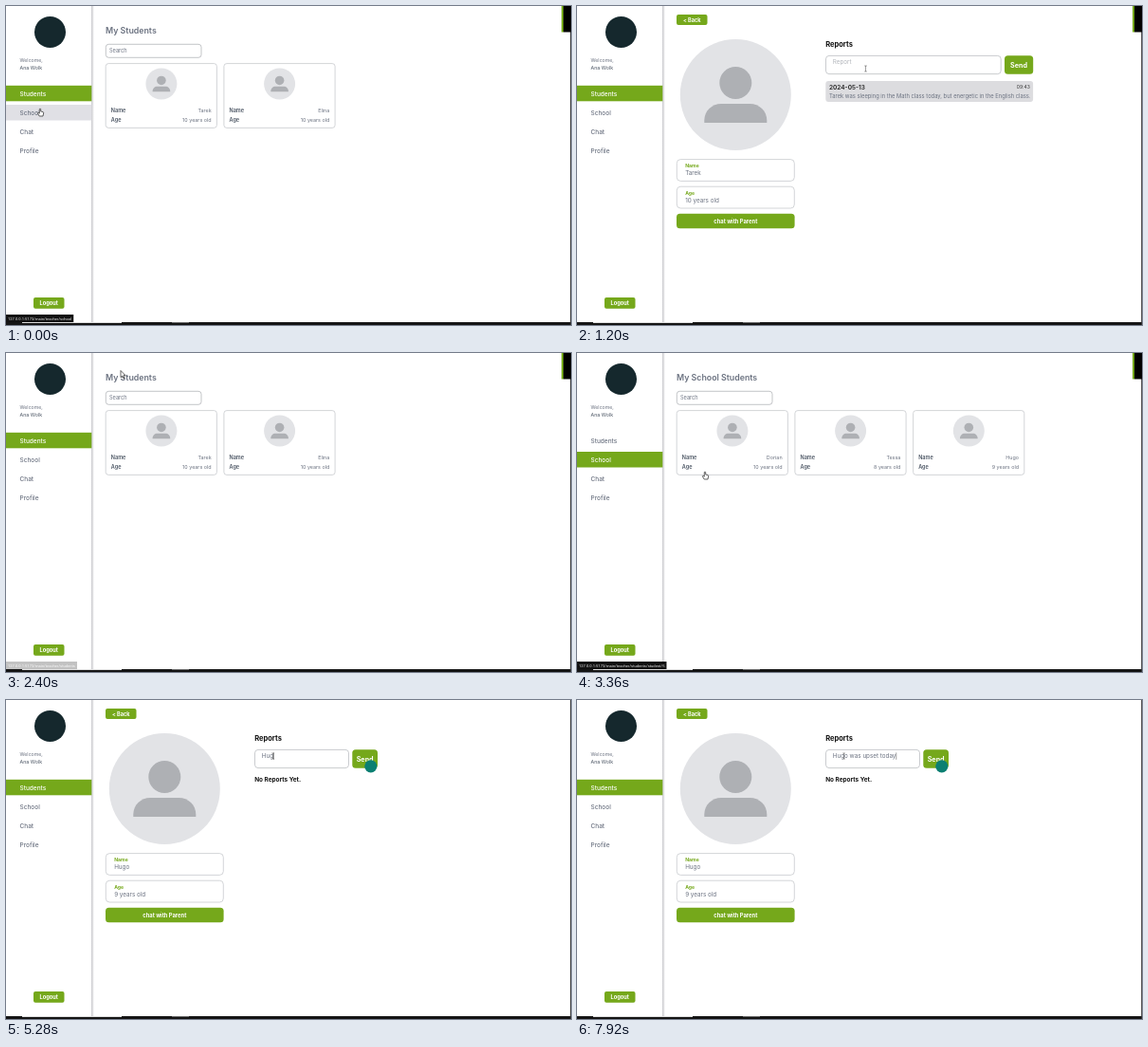
An HTML page for the animation above (8 s loop, 596 by 336 pixels).

```html
<!DOCTYPE html>
<html lang="en">
<head>
<meta charset="utf-8">
<title>School portal</title>
<style>
html, body { margin: 0; width: 100%; height: 100%; overflow: hidden; background: #fff; }
svg { display: block; width: 100vw; height: 100vh; }
text { font-family: Inter, Roboto, sans-serif; white-space: pre; }
.status text { font-family: Roboto, "Open Sans", sans-serif; }
</style>
</head>
<body>
<svg id="stage" viewBox="0 0 596 336">
  <defs>
    <linearGradient id="edge">
      <stop offset="0" stop-color="#c6c6ca"/>
      <stop offset="1" stop-color="#fff"/>
    </linearGradient>
    <g id="avatar">
      <circle r="58.5" fill="#e2e3e6"/>
      <circle cy="-12.5" r="17" fill="#aeb0b4"/>
      <path d="M-33 29.500V27C-33 17-25 9.500-15 9.500H15C25 9.500 33 17 33 27V29.500z" fill="#aeb0b4"/>
    </g>
  </defs>
</svg>
<script>
const LOOP = 8000;
const GREEN = '#75a81b', GRAY = '#6b7280', DARK = '#4b5563', LINE = '#c0c3c7';
const stage = document.getElementById('stage');

function add(parent, tag, attrs = {}, content) {
  const node = document.createElementNS('http://www.w3.org/2000/svg', tag);
  for (const key in attrs) node.setAttribute(key, attrs[key]);
  if (content !== undefined) node.textContent = content;
  return parent.appendChild(node);
}
const group = (parent, cls = '') => add(parent, 'g', { class: cls });
const box = (parent, x, y, width, height, fill, rx = 0, stroke = 'none') =>
  add(parent, 'rect', { x, y, width, height, fill, rx, stroke, 'stroke-width': 0.7 });
const label = (parent, x, y, str, size, fill = GRAY, weight = 400, anchor = 'start') =>
  add(parent, 'text', { x, y, 'font-size': size, fill, 'font-weight': weight, 'text-anchor': anchor }, str);
const show = (node, on) => node.setAttribute('display', on ? 'inline' : 'none');

function button(parent, x, y, w, h, str, size, rx = 2) {
  box(parent, x, y, w, h, GREEN, rx);
  label(parent, x + w / 2, y + h / 2 + size * 0.36, str, size, '#fff', 700, 'middle');
}

function listPage(title, students) {
  const page = group(stage);
  label(page, 105, 29.2, title, 8.8, GRAY, 600);
  box(page, 105.3, 40.3, 100.7, 14, '#fff', 3, '#a9acb1');
  label(page, 109, 49.3, 'Search', 5.6);
  students.forEach(([name, age], i) => {
    const x = 105.2 + i * 124.7;
    box(page, x, 60.6, 117.2, 67.8, '#fff', 3, LINE);
    add(page, 'use', { href: '#avatar', transform: `translate(${x + 58.7} 82) scale(.282)` });
    [['Name', name], ['Age', age + ' years old']].forEach(([key, value], row) => {
      const y = 112.2 + row * 9.5;
      label(page, x + 5.6, y, key, 5.5, DARK, 600);
      label(page, x + 111.4, y, value, 5.4, GRAY, 400, 'end');
    });
  });
  return page;
}

function studentPage(name, age, fieldWidth, sendWidth) {
  const page = group(stage);
  button(page, 105, 9, 32.5, 11, '< Back', 5.6);
  add(page, 'use', { href: '#avatar', transform: 'translate(167.3 93.5)' });
  [['Name', name], ['Age', age + ' years old']].forEach(([key, value], row) => {
    const y = 161.6 + row * 28.6;
    box(page, 105.3, y, 124, 22.8, '#fff', 4, LINE);
    label(page, 114.2, y + 8.3, key, 5.1, GREEN, 700);
    label(page, 114.2, y + 16.5, value, 6.3);
  });
  button(page, 105, 218.8, 124.6, 15.4, 'chat with Parent', 5.8, 3.5);
  label(page, 262.2, 42.6, 'Reports', 7.5, '#111', 700);
  box(page, 262.5, 52.4, fieldWidth, 19.2, '#fff', 3.5, '#b3b6ba');
  button(page, 262.5 + fieldWidth + 3.8, 52.2, sendWidth, 19.6, 'Send', 7.2, 3.5);
  return page;
}

// Sidebar
box(stage, 0, 0, 596, 336, '#fff');
add(stage, 'rect', { x: 90, y: 0, width: 3, height: 333, fill: 'url(#edge)' });
add(stage, 'circle', { cx: 46.5, cy: 27.5, r: 16.5, fill: '#15282d' });
label(stage, 14.5, 59.2, 'Welcome,', 5.2);
label(stage, 14.5, 66.6, 'Ana Wolk', 5.3, DARK);
const hover = box(stage, 0, 104, 90.3, 16.5, '#e0e0e5');
const active = box(stage, 0, 83.8, 90.3, 16.5, GREEN);
const menu = ['Students', 'School', 'Chat', 'Profile'].map((item, i) =>
  label(stage, 14.5, 94.6 + i * 20.2, item, 6.5, GRAY, 500));
button(stage, 29, 307, 32.5, 11.8, 'Logout', 5.7);

// Pages
const pages = {
  mine: listPage('My Students', [['Tarek', 10], ['Elina', 10]]),
  school: listPage('My School Students', [['Dorian', 10], ['Tessa', 8], ['Hugo', 9]]),
  first: studentPage('Tarek', 10, 184.7, 30.2),
  second: studentPage('Hugo', 9, 99, 26.7)
};
label(pages.first, 269.8, 61.4, 'Report', 6.3, '#b3b6bc');
box(pages.first, 262.3, 79, 218.8, 22, '#dcdcdf', 3);
label(pages.first, 266, 88, '2024-05-13', 6.5, '#222', 600);
label(pages.first, 477.8, 87.2, '09:43', 5, '#333', 400, 'end');
label(pages.first, 266, 97, 'Tarek was sleeping in the Math class today, but energetic in the English class.', 5.8);

label(pages.second, 262.2, 86.4, 'No Reports Yet.', 6.45, '#111', 700);
const hint = label(pages.second, 269.8, 61.4, 'Report', 6.3, '#b3b6bc');
const typed = label(pages.second, 269.8, 61.4, '', 6.3);
const caret = box(pages.second, 0, 55.4, 0.5, 7.4, '#444');
const helper = add(pages.second, 'circle', { cx: 384.8, cy: 69.8, r: 6.6, fill: '#0b7f72' });

// Link preview
const status = group(stage, 'status');
const statusBox = box(status, 0, 325, 72, 8.6, '#111');
const statusText = label(status, 2, 330.9, '', 4.1, '#eee');

// Screen edges
box(stage, 0, 333, 596, 3, '#141414');
box(stage, 17, 333, 105, 1, '#dcdcdc');
box(stage, 175, 333, 18, 1, '#666');
box(stage, 595.2, 0, 0.8, 336, '#333');
const corner = group(stage);
box(corner, 588, 0, 8, 27.5, '#000');
box(corner, 586, 0, 2, 27.5, GREEN);

// Pointer shapes, drawn around their hot spot
const pointer = group(stage);
const shapes = {
  arrow: add(pointer, 'path', { d: 'M0 0V7.200L1.700 5.700 2.800 8.200 4 7.700 2.900 5.200H5.100z' }),
  hand: add(pointer, 'path', { d: 'M-.7 .5Q0-.5.7.500V3L3.200 3.600Q3.800 4 3.600 5L3 8H-.8L-2.700 4.800Q-2.300 4-1.500 4.500L-.7 5.200z' }),
  beam: add(pointer, 'path', { d: 'M-1.300-3H1.300M0-3V3M-1.300 3H1.300' })
};
for (const key of ['arrow', 'hand']) {
  shapes[key].setAttribute('fill', '#fff');
  shapes[key].setAttribute('stroke', '#222');
  shapes[key].setAttribute('stroke-width', 0.7);
}
shapes.beam.setAttribute('stroke', '#444');
shapes.beam.setAttribute('stroke-width', 0.5);

// Timelines: the last entry whose time has come applies
const scenes = [[0, 'mine'], [640, 'first'], [2240, 'mine'], [2880, 'school'], [4000, 'second']];
const shapeAt = [[0, 'hand'], [180, 'arrow'], [320, 'hand'], [640, 'arrow'], [1000, 'beam'],
  [1360, 'arrow'], [1600, 'hand'], [2240, 'arrow'], [2640, 'hand'], [3000, 'arrow'],
  [3160, 'hand'], [4000, 'arrow'], [4400, 'beam']];
const links = [[0, 'school'], [240, ''], [320, 'students/student/1'], [720, ''], [1600, 'students'],
  [2480, ''], [2640, 'school'], [3040, ''], [3160, 'students/student/5'],
  [3660, 'students/student/7'], [4080, '']];
const route = [[0, 36, 108], [80, 36, 108], [480, 150, 95], [720, 150, 95], [1120, 304.5, 66],
  [1280, 304.5, 66], [1680, 121, 18.5], [2420, 121, 18.5], [2800, 30, 110], [2920, 30, 110],
  [3300, 135, 125], [3440, 135, 125], [3840, 410, 100], [4080, 410, 100], [4560, 281.6, 59]];
const CORNER_END = 4000;
const NOTE = 'Hugo was upset today';

const current = (list, t) => list.filter(entry => entry[0] <= t).pop()[1];

function position(t) {
  const next = route.findIndex(p => p[0] > t);
  if (next < 0) return route[route.length - 1].slice(1);
  const [t0, x0, y0] = route[next - 1], [t1, x1, y1] = route[next];
  const u = (t - t0) / (t1 - t0), k = u * u * (3 - 2 * u);
  return [x0 + (x1 - x0) * k, y0 + (y1 - y0) * k];
}

function typedCount(t) {
  const n = t < 6880 ? 3 + Math.floor((t - 5280) / 160) : 13 + Math.floor((t - 6880) / 148);
  return Math.max(0, Math.min(NOTE.length, n));
}

function draw(t) {
  const scene = current(scenes, t);
  for (const key in pages) show(pages[key], key === scene);
  show(corner, t < CORNER_END);
  const selected = scene === 'school' ? 1 : 0;
  active.setAttribute('y', 83.8 + selected * 20.2);
  menu.forEach((item, i) => item.setAttribute('fill', i === selected ? '#fff' : GRAY));

  const [x, y] = position(t);
  show(hover, x < 90 && y > 104 && y < 121);
  pointer.setAttribute('transform', `translate(${x} ${y})`);
  const shape = current(shapeAt, t);
  for (const key in shapes) show(shapes[key], key === shape);

  const link = current(links, t);
  show(status, link);
  status.setAttribute('opacity', t >= 2320 && t < 2480 ? 0.25 : 1);
  statusText.textContent = '127.0.0.1:5173/main/teacher/' + link;
  if (link) statusBox.setAttribute('width', statusText.getComputedTextLength() + 4);

  const count = typedCount(t), focused = t >= 4640;
  typed.textContent = NOTE.slice(0, count);
  show(hint, !count);
  show(caret, focused);
  show(helper, focused);
  if (focused) caret.setAttribute('x', 269.8 + (count ? typed.getComputedTextLength() : 0) + 0.2);
}

const start = performance.now();
function tick() {
  draw((performance.now() - start) % LOOP);
  requestAnimationFrame(tick);
}
tick();
</script>
</body>
</html>
```
